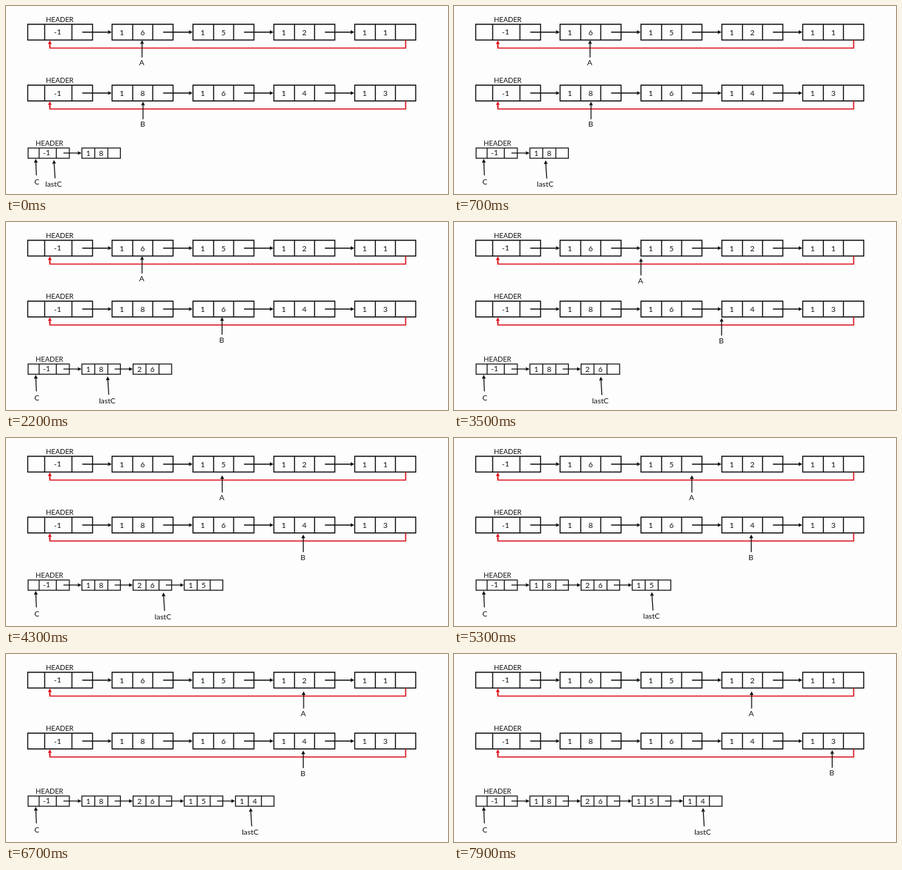
An HTML page that plays this animation: 600x257 px, repeating every 8000 ms.

```html
<!DOCTYPE html>
<html lang="en">
<head>
<meta charset="utf-8">
<title>Adding two circular lists</title>
<style>
  html, body { margin: 0; width: 100%; height: 100%; overflow: hidden; background: #fdfdfd; }
  svg { display: block; width: 600px; height: 257px; }
  text { font: 10.3px Lato, Carlito, sans-serif; text-anchor: middle; fill: #111; }
  .title { font-size: 9.4px; }
  .line { fill: none; stroke: #111; stroke-width: 1.4; }
  .thin { stroke-width: 1.25; }
  .head { fill: #111; }
  .red.line { stroke: #dc1420; stroke-width: 1.6; }
  .red.head { fill: #dc1420; }
</style>
</head>
<body>
<svg id="stage" viewBox="0 0 600 257"></svg>
<script>
const LOOP = 8000, STEP = 100, MOVE = 960;
const stage = document.getElementById('stage');

function add(parent, tag, attrs, text) {
  const el = document.createElementNS('http://www.w3.org/2000/svg', tag);
  for (const key in attrs) el.setAttribute(key, attrs[key]);
  if (text !== undefined) el.textContent = text;
  parent.append(el);
  return el;
}
const group = () => add(stage, 'g', {});
const line = (g, d, cls = '') => add(g, 'path', { d, class: 'line ' + cls });
const label = (g, x, y, text, cls = '') => add(g, 'text', { x, y, class: cls }, text);

// Straight arrow from (x1, y1) with its tip at (x2, y2)
function arrow(g, x1, y1, x2, y2, cls = '') {
  const a = Math.atan2(y2 - y1, x2 - x1), c = Math.cos(a), s = Math.sin(a);
  const bx = x2 - 5 * c, by = y2 - 5 * s, w = 2.6;
  line(g, `M${x1} ${y1}L${bx} ${by}`, cls);
  add(g, 'path', {
    d: `M${x2} ${y2}L${bx - w * s} ${by + w * c}L${bx + w * s} ${by - w * c}Z`,
    class: 'head ' + cls
  });
}

// Box with dividers at the given offsets
function box(g, x, y, w, h, splits, cls) {
  const bars = splits.map(dx => `M${x + dx} ${y}v${h}`).join('');
  line(g, `M${x} ${y}h${w}v${h}h${-w}Z${bars}`, cls);
}

function circularList(y, terms) {
  const g = group(), mid = y + 10.7;
  label(g, 73, y - 3.2, 'HEADER', 'title');
  box(g, 29.5, y, 88, 21.5, [23, 60]);
  label(g, 70, y + 14.3, '-1');
  terms.forEach((coef, i) => {
    const x = 144 + i * 109.8;
    arrow(g, x - 40.5, mid, x - 0.5, mid);
    box(g, x, y, 82.8, 21.5, [28, 55.2]);
    label(g, x + 13.3, y + 14.7, 1);
    label(g, x + 41.5, y + 14.7, coef);
  });
  line(g, `M542.5 ${y + 21.5}v11H59.5v-5`, 'red');
  arrow(g, 59.5, y + 31, 59.5, y + 22, 'red');
}

function resultNode(i, power, coef) {
  const g = group(), x = 103 + i * 69.5;
  arrow(g, x - 25, 201, x - 0.5, 201, 'thin');
  box(g, x, 194, 52.3, 14, [17.5, 35.2], 'thin');
  label(g, x + 8.7, 204.8, power);
  label(g, x + 26.2, 204.8, coef);
  return g;
}

// Pointer whose tip sits at the group's own zero point
function pointer(name, length, lean, drop) {
  const g = group();
  arrow(g, lean, length, 0, 0, 'thin');
  label(g, -0.5, drop, name);
  return g;
}

circularList(25, [6, 5, 2, 1]);
circularList(108.3, [8, 6, 4, 3]);

const base = group();
label(base, 59, 190.8, 'HEADER', 'title');
box(base, 30, 194, 56, 14, [15, 38.3], 'thin');
label(base, 55, 204.2, '-1');
arrow(base, 41.3, 231.5, 40.3, 209, 'thin');
label(base, 42, 243.5, 'C');
resultNode(0, 1, 8);

const nodes = [
  { at: 1890, el: resultNode(1, 2, 6) },
  { at: 3930, el: resultNode(2, 1, 5) },
  { at: 5920, el: resultNode(3, 1, 4) }
];

// Each move is [start time, x, y] towards the next resting place
const pointers = [
  { el: pointer('A', 23.5, 0, 34.3), from: [184.7, 46.7],
    moves: [[2950, 293.5, 51], [4950, 404, 51]] },
  { el: pointer('B', 24, 0, 34.6), from: [186, 130.7],
    moves: [[900, 293.3, 130], [2950, 403.5, 132], [6990, 514, 131.5]] },
  { el: pointer('lastC', 25, 1.6, 36.5), from: [64.5, 210.5],
    moves: [[-60, 130, 211], [1970, 199.2, 211.5], [3990, 268.5, 210.7], [5940, 338, 210.5]] }
];

function ease(p) {
  p = Math.min(1, Math.max(0, p));
  return p < 0.5 ? 2 * p * p : 1 - 2 * (1 - p) ** 2;
}

function draw(t) {
  for (const { at, el } of nodes) el.style.visibility = t >= at ? 'visible' : 'hidden';
  for (const { el, from, moves } of pointers) {
    let [x, y] = from;
    for (const [start, toX, toY] of moves) {
      const p = ease((t - start) / MOVE);
      x += (toX - x) * p;
      y += (toY - y) * p;
    }
    el.setAttribute('transform', `translate(${x.toFixed(2)} ${y.toFixed(2)})`);
  }
}

let began;
function tick(now) {
  began ??= now;
  // The motion advances in held steps; the slack absorbs timer rounding
  draw(Math.floor(((now - began + 5) % LOOP) / STEP) * STEP);
  requestAnimationFrame(tick);
}
draw(0);
requestAnimationFrame(tick);
</script>
</body>
</html>
```
